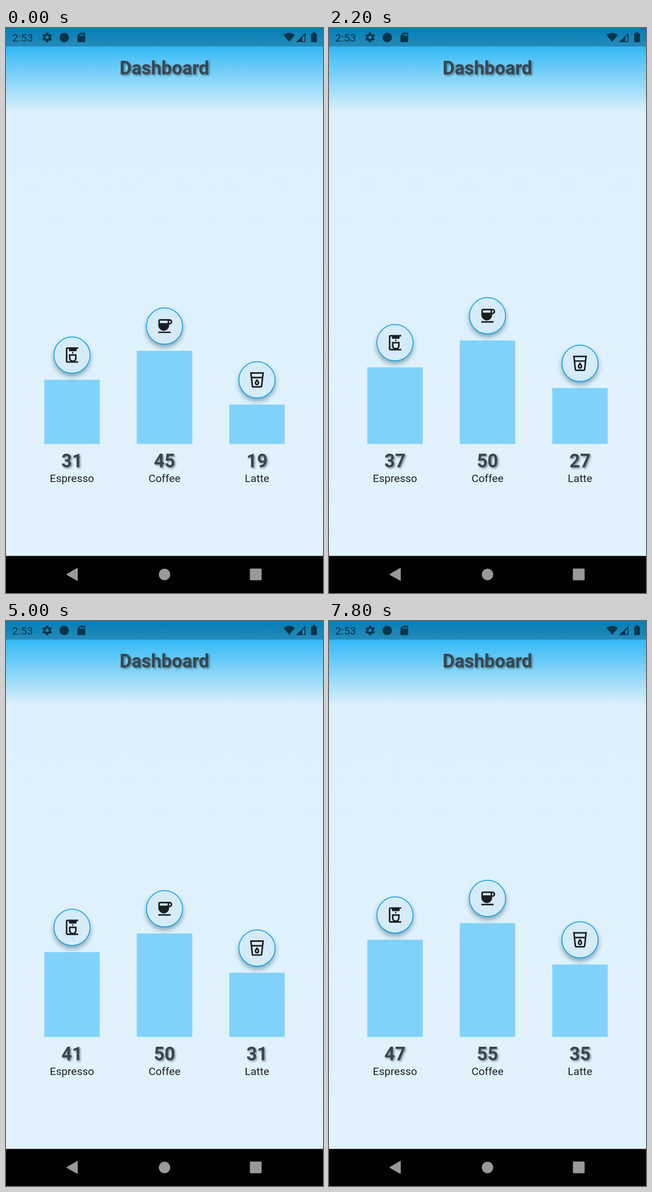
An HTML page with a canvas that plays this animation: 561x998 px, repeating every 8000 ms.

```html
<!DOCTYPE html>
<html lang="en">
<head>
<meta charset="utf-8">
<title>Dashboard</title>
<style>
  html, body { margin: 0; width: 100%; height: 100%; overflow: hidden; background: #000; }
  canvas { display: block; width: 561px; height: 998px; }
</style>
</head>
<body>
<canvas id="stage"></canvas>
<script>
const W = 561, H = 998, LOOP = 8000;
const DP = W / 411.43;
const BASE = 734.6, UNIT = 3.653;
const BAR_W = 72 * DP, BADGE_R = 24 * DP;
const NAV_TOP = 932.5, STATUS_H = 24 * DP;
const INK = 'rgba(0,0,0,0.6)';

const canvas = document.getElementById('stage');
const ctx = canvas.getContext('2d');
const ratio = window.devicePixelRatio || 1;
canvas.width = Math.round(W * ratio);
canvas.height = Math.round(H * ratio);

// Icon outlines on a 24 unit grid
const maker = new Path2D(
  'M18 6V4h2V2H6c-1.1 0-2 .9-2 2v16c0 1.1.9 2 2 2h14v-2h-4.03c1.23-.91 2.03-2.36 2.03-4v-5H8v5' +
  'c0 1.64.81 3.09 2.03 4H6V4h2v2c0 .55.45 1 1 1h8c.55 0 1-.45 1-1z' +
  'M10 16v-3h6v3c0 1.65-1.35 3-3 3s-3-1.35-3-3zM12 9a1 1 0 1 0 2 0a1 1 0 1 0-2 0z');
const cup = new Path2D(
  'M18.5 3H6c-1.1 0-2 .9-2 2v5.71c0 3.83 2.95 7.18 6.78 7.29 3.96.12 7.22-3.06 7.22-7v-1h.5' +
  'c1.93 0 3.5-1.57 3.5-3.5S20.43 3 18.5 3zM16 5v3H6V5h10z' +
  'M18.5 8H18V5h.5c.83 0 1.5.67 1.5 1.5S19.33 8 18.5 8zM4 19h16v2H4z');
const glass = new Path2D(
  'M3 2l2.01 18.23C5.13 21.23 5.97 22 7 22h10c1.03 0 1.87-.77 1.99-1.77L21 2z' +
  'M17 20H7L5.89 10H18.1zM18.33 8H5.67l-.44-4h13.55z' +
  'M12 19c1.66 0 3-1.34 3-3 0-2-3-5.4-3-5.4S9 14 9 16c0 1.66 1.34 3 3 3z' +
  'M12 13.91c.59.91 1 1.73 1 2.09 0 .55-.45 1-1 1s-1-.45-1-1c0-.37.41-1.19 1-2.09z');

const drinks = [
  { name: 'Espresso', x: 116.8, icon: maker, count: n => 31 + 2 * n },
  { name: 'Coffee', x: 280.5, icon: cup, count: n => 45 + 5 * Math.floor(n / 3) },
  { name: 'Latte', x: 444.2, icon: glass, count: n => 19 + 4 * Math.ceil(n / 2) }
];

function rect(x, y, w, h, color) {
  ctx.fillStyle = color;
  ctx.fillRect(x, y, w, h);
}

function disc(x, y, r, color) {
  ctx.fillStyle = color;
  ctx.beginPath();
  ctx.arc(x, y, r, 0, Math.PI * 2);
  ctx.fill();
}

function shape(d, color, rule = 'nonzero') {
  ctx.fillStyle = color;
  ctx.fill(new Path2D(d), rule);
}

function gradient(y0, y1, from, to) {
  const g = ctx.createLinearGradient(0, y0, 0, y1);
  g.addColorStop(0, from);
  g.addColorStop(1, to);
  return g;
}

function shadow(color, dx, dy, blur) {
  ctx.shadowColor = color;
  ctx.shadowOffsetX = dx * ratio;
  ctx.shadowOffsetY = dy * ratio;
  ctx.shadowBlur = blur * ratio;
}

function text(str, x, y, size, color, weight = 400, align = 'center') {
  ctx.font = `${weight} ${size * DP}px Roboto, sans-serif`;
  ctx.textAlign = align;
  ctx.fillStyle = color;
  ctx.fillText(str, x, y);
}

function heading(str, x, y) {
  ctx.save();
  shadow('rgba(0,0,0,0.42)', 2, 2, 3.5);
  text(str, x, y, 24, '#37474f', 700);
  ctx.restore();
}

function gear(cx, cy) {
  const p = new Path2D();
  for (let i = 0; i < 6; i++) {
    const a = i * Math.PI / 3 + Math.PI / 6 * 3;
    for (const [off, r] of [[-0.34, 6.4], [-0.24, 8.9], [0.24, 8.9], [0.34, 6.4]]) {
      p.lineTo(cx + r * Math.cos(a + off), cy + r * Math.sin(a + off));
    }
  }
  p.closePath();
  p.moveTo(cx + 3, cy);
  p.arc(cx, cy, 3, 0, Math.PI * 2);
  ctx.fillStyle = INK;
  ctx.fill(p, 'evenodd');
}

function statusBar() {
  rect(0, 0, W, STATUS_H, 'rgba(0,0,0,0.25)');
  text('2:53', 11, 24, 14, INK, 400, 'left');
  gear(72.7, 16.6);
  disc(103, 16.8, 8.4, INK);
  // Memory card
  shape('M131.3 8.3H138.6Q140.2 8.3 140.2 10V23.4Q140.2 25 138.6 25H128Q126.4 25 126.4 23.4V13.3Z' +
    'M131 10.6h1.6v3.6h-1.6zM133.8 10.6h1.6v3.6h-1.6zM136.6 10.6h1.6v3.6h-1.6z', INK, 'evenodd');
  // Wi-Fi, signal, battery
  shape('M501.2 24.2L491 12.2Q501.2 4.8 511.4 12.2Z', INK);
  shape('M513 25L530 8.4V25ZM524.4 16.4V23.4H528.4V12.4Z', INK, 'evenodd');
  shape('M543 7.6h4v1.8h1.8q1.4 0 1.4 1.4v12.8q0 1.4-1.4 1.4h-7.4q-1.4 0-1.4-1.4v-12.8q0-1.4 1.4-1.4h1.6z', INK);
}

function navBar() {
  const gray = '#999';
  rect(0, NAV_TOP, W, H - NAV_TOP, '#000');
  shape('M107.6 964.4L125.6 954Q127 953.3 127 955V975.4Q127 977 125.6 976.3L107.6 966Q106.4 965.2 107.6 964.4Z', gray);
  disc(280.5, 965.2, 10.2, gray);
  ctx.beginPath();
  ctx.roundRect(431.6, 954.7, 20.8, 20.8, 1.8);
  ctx.fill();
}

function badge(x, y, icon) {
  ctx.save();
  shadow('rgba(20,65,95,0.5)', 0, 5, 10);
  disc(x, y, BADGE_R - 0.5, '#d5ebf8');
  ctx.restore();
  ctx.strokeStyle = '#0aa2ea';
  ctx.lineWidth = 1.5;
  ctx.beginPath();
  ctx.arc(x, y, BADGE_R - 0.75, 0, Math.PI * 2);
  ctx.stroke();

  ctx.save();
  ctx.translate(x - 12 * DP, y - 12 * DP);
  ctx.scale(DP, DP);
  ctx.fillStyle = '#1b1f22';
  ctx.fill(icon, 'evenodd');
  ctx.restore();
}

function column({ name, x, icon, count }, n) {
  const value = count(n);
  const top = BASE - value * UNIT;
  rect(x - BAR_W / 2, top, BAR_W, BASE - top, '#81d2f9');
  badge(x, top - BADGE_R - 8 * DP, icon);
  heading(String(value), x, 776);
  text(name, x, 801.6, 14, '#1c2226');
}

function draw(t) {
  const ticks = Math.floor((t + 800) / 1000);
  ctx.setTransform(ratio, 0, 0, ratio, 0, 0);
  rect(0, 0, W, H, gradient(150, NAV_TOP, '#def1fb', '#e1f2fd'));
  rect(0, 0, W, 150, gradient(0, 150, '#03a9f4', '#def1fb'));
  statusBar();
  heading('Dashboard', 280.3, 82.3);
  drinks.forEach(d => column(d, ticks));
  navBar();
}

function loop() {
  draw(performance.now() % LOOP);
  requestAnimationFrame(loop);
}
loop();
</script>
</body>
</html>
```
